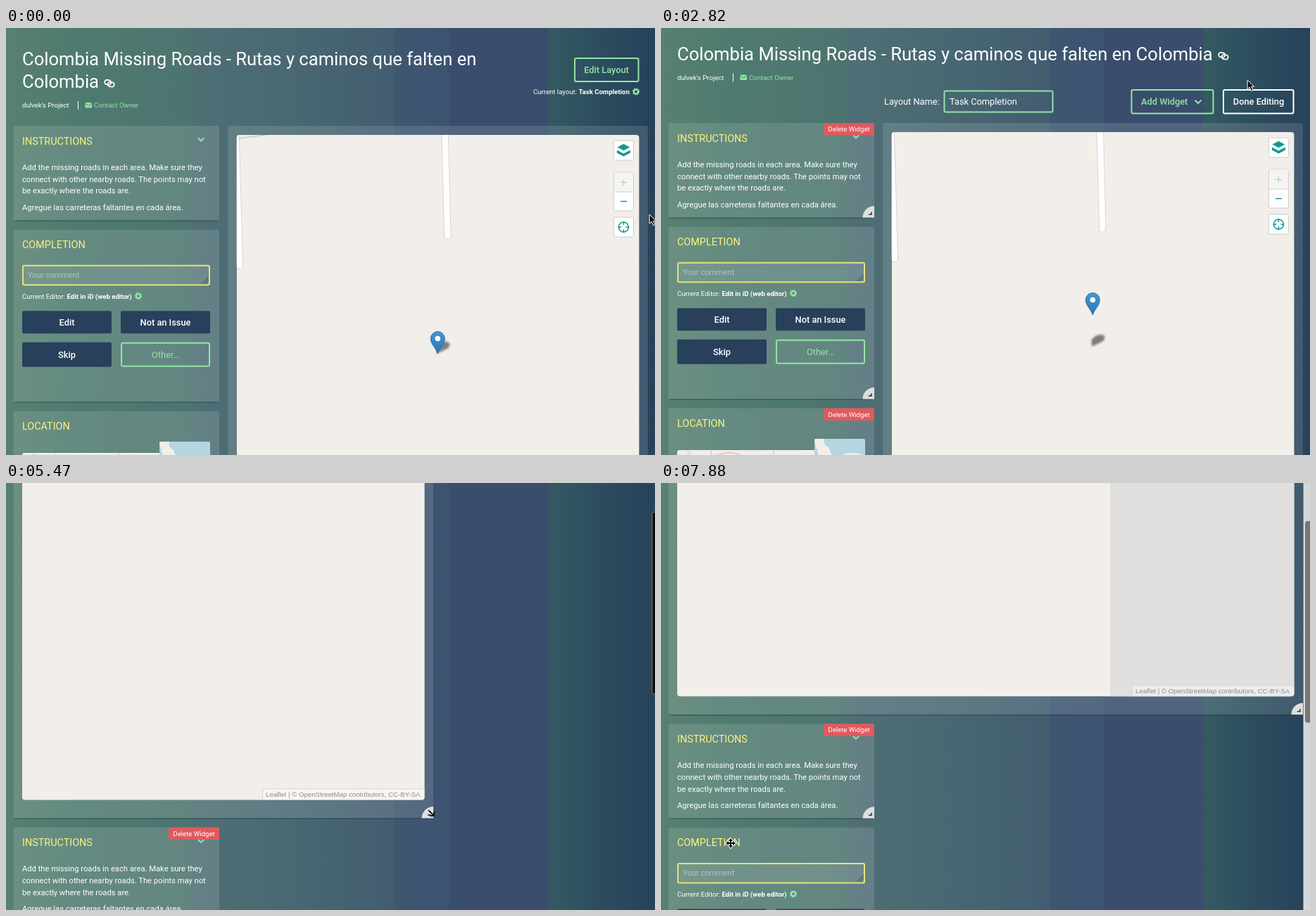
An HTML page that plays this animation: 922x607 px, repeating every 8 s.

```html
<!DOCTYPE html>
<html lang="en">
<head>
<meta charset="utf-8">
<style>
html, body { margin: 0; width: 100%; height: 100%; overflow: hidden; }
svg { display: block; font-family: Roboto, sans-serif; }
.m { font-weight: 500; }
.b { font-weight: 700; }
.i { font-style: italic; }
.c { text-anchor: middle; }
.sans { font-family: "Liberation Sans", Arial, sans-serif; }
</style>
</head>
<body>
<svg id="stage" width="922" height="607" viewBox="0 0 922 607"></svg>
<script>
const LOOP = 8000, ROW = 36.8, COL = 76.2, LEFT = 10.5;
const GREEN = '#91e6a6', YELLOW = '#f8f382', NAVY = '#28405b', TEAL = '#0f9a8c';

// --- markup helpers ---
const text = (x, y, s, size, fill = '#fff', cls = '') =>
  `<text x="${x}" y="${y}" font-size="${size}" fill="${fill}" class="${cls}">${s}</text>`;
const box = (x, y, w, h, fill, r = 0, more = '') =>
  `<rect x="${x}" y="${y}" width="${w}" height="${h}" rx="${r}" fill="${fill}" ${more}/>`;
const frame = (x, y, w, h, color) =>
  box(x + 1, y + 1, w - 2, h - 2, 'none', 2, `stroke="${color}" stroke-width="2"`);
const line = (d, color, width = 1, more = '') =>
  `<path d="${d}" fill="none" stroke="${color}" stroke-width="${width}" ${more}/>`;
const use = (id, x, y) => `<use href="#${id}" x="${x}" y="${y}"/>`;
const group = (id, body) => `<g id="${id}">${body}</g>`;
const button = (x, y, w, h, label) =>
  box(x, y, w, h, NAVY, 2) + text(x + w / 2, y + h / 2 + 4.5, label, 12.8, '#fff', 'm c');
const panel = h => box(0, 0, 292.5, h, '#fff', 3, 'fill-opacity=".12"') +
  line(`M2 ${h + .5}H290`, '#16303a', 1.5, 'opacity=".4"');
const handle = (x, y) => `<g class="edit">${use('handle', x, y)}</g>`;
const remove = `<g class="edit">${box(220.5, 0, 72, 17.5, '#df5a5f', 2)}` +
  text(256.5, 12.2, 'Delete Widget', 9.6, '#fff', 'c') + '</g>';
const chevron = (x, y) => line(`M${x - 4.5} ${y - 2.5}l4.5 4.5l4.5 -4.5`, GREEN, 2);

const stops = [[0, '#57806f'], [100, '#4f7a70'], [264, '#4d7470'], [265, '#4f6f75'], [400, '#496872'],
  [552, '#425d70'], [553, '#3f5671'], [629, '#3c5470'], [630, '#3a4d6c'], [770, '#3a4d6c'],
  [771, '#345a62'], [840, '#2d4d5f'], [922, '#27425a']];

const defs = `<defs>
  <linearGradient id="bg">${stops.map(([x, c]) => `<stop offset="${x / 922}" stop-color="${c}"/>`).join('')}</linearGradient>
  <linearGradient id="blue" x2="0" y2="1"><stop stop-color="#3f9ad6"/><stop offset="1" stop-color="#2a76b4"/></linearGradient>
  <filter id="soft" x="-50%" y="-50%" width="200%" height="200%"><feGaussianBlur stdDeviation="1.6"/></filter>
  <clipPath id="mapClip"><rect id="mapHole" rx="4"/></clipPath>
  <clipPath id="locClip">${box(12.5, 59.5, 255, 154, '#000', 3)}</clipPath>
  <clipPath id="insetClip">${box(207.5, 43.5, 72, 72, '#000', 2)}</clipPath>
  <g id="gear"><circle r="3" fill="none" stroke="${GREEN}" stroke-width="2.2"/>
    <circle r="4.3" fill="none" stroke="${GREEN}" stroke-width="1.6" stroke-dasharray="1.8 1.58"/></g>
  <g id="link" fill="none" stroke="#fff" stroke-width="1.7">
    <rect x="-7" y="-4" width="9" height="6.5" rx="3.2" transform="rotate(12)"/>
    <rect x="-2" y="-2" width="9" height="6.5" rx="3.2" transform="rotate(12)"/></g>
  <g id="handle"><path d="M0 0H-16.5A16.5 16.5 0 0 1 0 -16.5Z" fill="#dcdfde"/>
    <path d="M-4 -8V-4.5H-8" fill="none" stroke="#333" stroke-width="1.6"/></g>
  <g id="pin"><path d="M0 0C-2 -8 -10 -13 -10 -21.5A10 10 0 0 1 10 -21.5C10 -13 2 -8 0 0Z" fill="url(#blue)" stroke="#2b6ca3"/>
    <circle cy="-21.5" r="3.8" fill="#fff"/></g>
  <path id="shade" d="M-1 0L-2 -9Q4 -18 13 -17Q20 -15 15 -8Z" fill="#333" opacity=".6" filter="url(#soft)"/>
  <path id="arrow" d="M0 0V13L3.2 10.2L5.6 15.6L8 14.6L5.6 9.4H9.6Z" fill="#111" stroke="#fff"/>
  <path id="hand" d="M-2 8V-1Q0 -3 2 -1V5L8 7V12L6 16H-1L-6 9Q-5 6 -2 8Z" fill="#fff" stroke="#111"/>
  <g id="grab" stroke="#222"><path d="M-4 -3Q-2 -6 0 -4Q2 -6 4 -3Q6 -3 5 1Q4 5 2 5H-2L-5 1Q-6 -2 -4 -3Z" fill="#fff"/>
    <path d="M-2 -3V-1M0 -3V-1M2 -3V-1"/></g>
  <g id="resize"><path d="M-4.5 -4.5L3 3" stroke="#fff" stroke-width="4"/><path d="M-4 -4L3 3M4 -2V4H-2" fill="none" stroke="#111" stroke-width="2"/></g>
  <g id="move"><path d="M0 -7L3 -3H1V-1H3V-3L7 0L3 3V1H1V3H3L0 7L-3 3H-1V1H-3V3L-7 0L-3 -3V-1H-1V-3H-3Z" fill="#111" stroke="#fff" stroke-width="2" paint-order="stroke"/></g>
</defs>`;

const owner = group('owner', text(23, 113.3, 'dulvek\'s Project', 9.6) + line('M102.5 104V116', '#fff') +
  box(112.5, 106, 9.5, 7.5, GREEN, 1) + line('M112.5 107l4.7 3.6l4.8 -3.6', '#4b7473') +
  text(125, 113.3, 'Contact Owner', 9.6, GREEN));
const title = 'Colombia Missing Roads - Rutas y caminos que falten en';

const header = '<g class="view">' +
  text(23, 53.3, title, 25.6) + text(23, 85.3, 'Colombia', 25.6) + use('link', 147, 78.5) +
  frame(807, 42, 92.5, 35, GREEN) + text(853, 64.3, 'Edit Layout', 12.8, GREEN, 'm c') +
  text(749, 94.4, 'Current layout: <tspan class="b">Task Completion</tspan>', 9.6) + use('gear', 895, 90.5) + '</g>' +
  '<g class="edit">' + text(23, 46, title + ' Colombia', 25.6) + use('link', 799, 39.5) +
  text(317, 109, 'Layout Name:', 12.8) + frame(401.5, 88.5, 156, 32, GREEN) + text(410, 109, 'Task Completion', 12.8) +
  frame(667.5, 87, 118, 35.5, GREEN) + text(682, 109, 'Add Widget', 12.8, GREEN, 'm') + chevron(763, 105) +
  frame(798, 87, 101.5, 35.5, '#fff') + text(849, 109, 'Done Editing', 12.8, '#fff', 'm c') + '</g>' + owner;

const instructions = group('instr', panel(134.5) + text(12.5, 27, 'INSTRUCTIONS', 14.4, YELLOW) + chevron(266.5, 19.5) +
  ['Add the missing roads in each area. Make sure they', 'connect with other nearby roads. The points may not',
    'be exactly where the roads are.'].map((s, i) => text(12.5, 62.8 + i * 16.8, s, 11.2)).join('') +
  text(12.5, 119.8, 'Agregue las carreteras faltantes en cada área.', 11.2) + remove + handle(292.5, 134.5));

const completion = group('comp', panel(244.7) + text(12.5, 26.5, 'COMPLETION', 14.4, YELLOW) +
  box(12.5, 50, 267, 29.5, '#fff', 2, 'fill-opacity=".08"') + frame(12.5, 50, 267, 29.5, '#e3e27c') +
  line('M268 77l9 -9M272 77l5 -5', '#344', 1) + text(20.5, 68.5, 'Your comment', 11.2, '#b3c4bf') +
  text(12.5, 98.3, 'Current Editor: <tspan class="b">Edit in iD (web editor)</tspan>', 9.6) + use('gear', 177.5, 94.3) +
  button(12.5, 115.5, 127, 32, 'Edit') + button(152.5, 115.5, 127, 32, 'Not an Issue') +
  button(12.5, 160, 127, 35, 'Skip') + frame(152.5, 160, 127, 35, GREEN) + text(216, 182, 'Other…', 12.8, GREEN, 'c') +
  handle(292.5, 244.7));

const place = (x, y, s, cls) => text(x, y, s, 8, '#666', cls);
const locator = group('loc', panel(244.7) + text(12.5, 26.5, 'LOCATION', 14.4, YELLOW) +
  '<g clip-path="url(#locClip)">' + box(12, 59, 256, 155, '#f1eeea') +
  line('M12 90Q50 70 80 64T130 100T190 70M12 150Q60 120 90 160T170 130T268 170M60 60Q75 130 40 214M150 60Q135 150 190 214', '#e9b7ad', 1.1) +
  line('M30 60Q20 130 90 214M215 110Q190 150 230 214', '#d5dfcb', 6, 'opacity=".6"') +
  place(40, 108, 'Caldas', 'i') + place(28, 130, 'Manizales') + place(105, 122, 'Cundinamarca', 'i') +
  place(187.5, 75, 'Santiago') + place(187.5, 84, 'de Tunja') + use('shade', 141, 137) + use('pin', 140.5, 137) + '</g>' +
  '<g clip-path="url(#insetClip)">' + box(207, 43, 73, 73, '#b5d5e0') +
  `<path d="M207 43H222Q219 52 227 55L232 66Q238 78 246 67Q258 60 280 67V116H249Q236 105 237 91L225 79L213 66Z" fill="#f1eee7"/>` +
  line('M245 80Q258 87 256 110M256 89L280 93', '#cbbfc8') +
  `<path d="M243 72l1.9 5.1l5.4 .2l-4.3 3.4l1.5 5.2l-4.5 -3l-4.5 3l1.5 -5.2l-4.3 -3.4l5.4 -.2z" fill="#2a81cb"/></g>` +
  remove + handle(292.5, 244.7));

const control = (y, h) => box(-36, y, 28, h, '#fff', 2, 'stroke="#ccc"');
const controls = group('controls', control(8, 28) + control(53, 55) + control(117, 28) + box(-35.5, 53.5, 27, 27, '#f4f4f4') +
  line('M-36 81H-8', '#ccc') +
  `<path d="M-22 23.5l9.5 -5v4l-9.5 5l-9.5 -5v-4z" fill="${TEAL}" transform="translate(0 3)"/>` +
  `<path d="M-22 12.5l9.5 5l-9.5 5l-9.5 -5z" fill="${TEAL}" stroke="#fff" stroke-width=".6"/>` +
  line('M-26.5 67.5h9M-22 63v9', '#b3dba8', 1.3) + line('M-26.5 94.5h9', TEAL, 1.4) +
  `<circle cx="-22" cy="131" r="7" fill="none" stroke="${TEAL}" stroke-width="1.5"/>` +
  line('M-22 123v5M-22 134v5M-30 131h5M-19 131h5', TEAL, 1.5));
const roads = ['M326.5 130L332.5 338', 'M623.5 120L628 295.5'];
const map = group('map', box(0, 0, 0, 0, '#fff', 3, 'id="mapPanel" fill-opacity=".12"') +
  line('', '#16303a', 1.5, 'id="mapEdge" opacity=".4"') +
  '<g transform="translate(12.5 13)"><g clip-path="url(#mapClip)">' + box(0, 0, 900, 700, '#f2efea') +
  box(615, 0, 300, 700, '#e0dfdd') + group('pan', roads.map(d =>
    line(d, '#d8d5d3', 10.5, 'stroke-linecap="round"') + line(d, '#fff', 8.5, 'stroke-linecap="round"')).join('') +
    line('M331 157L373 151.5', '#bbb') + use('shade', 614, 463) + group('marker', use('pin', 614, 463))) +
  group('credit', box(-230, -15.5, 230, 15.5, '#fff', 0, 'fill-opacity=".4" stroke="#d8d6d3"') +
    text(-225.5, -4.2, 'Leaflet | © OpenStreetMap contributors, CC-BY-SA', 9.7, '#8b8b8b', 'sans')) +
  controls + '</g></g>' + `<g id="mapHandle">${handle(0, 0)}</g>`);

stage.innerHTML = defs + box(0, 0, 922, 607, 'url(#bg)') +
  group('page', header + box(0, 135, 0, 0, 'red', 0, 'id="ghost" fill-opacity=".2"') + instructions + completion + locator + map) +
  group('bar', box(912.5, 0, 10, 607, '#d3d9da', 0, 'id="track"') + box(0, 0, 10, 0, '#777', 4, 'id="thumb"')) +
  '<use id="cursor"/>';

// --- motion ---
const $ = id => document.getElementById(id);
const set = (id, attrs) => { for (const k in attrs) $(id).setAttribute(k, attrs[k]); };
const at = (id, x, y) => set(id, { transform: `translate(${x} ${y})` });
const show = (id, on) => $(id).style.display = on ? '' : 'none';
const clamp = (v, lo, hi) => Math.min(hi, Math.max(lo, v));

// Piecewise linear value from [time, value...] keys
function track(keys, t, n = 1) {
  let i = keys.findIndex(k => k[0] > t);
  if (i < 0) return keys[keys.length - 1][n];
  if (!i) return keys[0][n];
  const a = keys[i - 1], b = keys[i];
  return a[n] + (b[n] - a[n]) * (t - a[0]) / (b[0] - a[0]);
}

const scrollKeys = [[290, 0], [500, 120], [780, 270], [930, 270], [1240, 73], [1350, 0], [4350, 0], [4590, 308]];
const mouseKeys = [[290, 914, 265], [350, 915, 266], [1590, 915, 266], [2000, 870, 80], [2180, 853, 52], [2400, 853, 52],
  [2820, 833.5, 73.5], [3180, 677, 220], [3650, 338, 186], [3940, 372, 221], [4000, 372, 221], [4180, 710, 283],
  [4820, 710, 283], [5470, 604, 469], [5820, 604, 469], [6000, 710, 468], [6250, 875, 450], [6350, 916, 420],
  [6590, 917, 400], [7000, 914, 316], [7180, 914, 316], [7410, 190, 570], [7590, 190, 570], [7880, 99, 512]];
const mouse = t => [track(mouseKeys, t, 1), track(mouseKeys, t, 2)];

const DRAG = [3180, 4000], SIZE = [5820, 7180];
const during = (t, [a, b]) => t >= a && t < b;

// Grid cell of the map: column, width, rows
function cell(t) {
  const col = t < DRAG[0] ? 4 : t < DRAG[1] ? clamp(4 + Math.round((mouse(t)[0] - 677) / COL), 0, 4) : 0;
  if (t < SIZE[0]) return { col, cols: 8, rows: 18 };
  const [x, y] = mouse(Math.min(t, SIZE[1]));
  return { col, cols: clamp(8 + Math.round((x - 604) / COL), 8, 12), rows: clamp(18 + Math.round((y - 469) / ROW), 14, 18) };
}
// The side widgets glide 200 ms behind the grid
function pushed(t) {
  let sum = 0;
  for (let i = 0; i < 20; i++) {
    const c = cell(t - i * 10);
    if (c.col < 4) sum += c.rows * ROW;
  }
  return sum / 20;
}

const cursors = [[0, 'arrow'], [2060, 'hand'], [2450, 'arrow'], [3180, 'grab'], [4000, 'arrow'],
  [5420, 'resize'], [6200, 'arrow'], [7700, 'move']];

function draw(t) {
  const edit = t >= 2350, top = edit ? 135 : 139, scroll = track(scrollKeys, t);
  const [mx, my] = mouse(t), { col, cols, rows } = cell(t);
  document.querySelectorAll('.view').forEach(e => e.style.display = edit ? 'none' : '');
  document.querySelectorAll('.edit').forEach(e => e.style.display = edit ? '' : 'none');
  at('page', 0, -scroll);
  at('owner', 0, edit ? -39.5 : 0);

  const y = top + pushed(t);
  at('instr', LEFT, y);
  at('comp', LEFT, y + 4 * ROW + .5);
  at('loc', LEFT, y + 11 * ROW + .8);

  const w = cols * COL - 13, h = rows * ROW - 13, dragging = during(t, DRAG);
  const [dx, dy] = dragging ? [mx - 677, my - 220] : [t < DRAG[0] ? 0 : -305, 0];
  at('map', dragging ? 315.7 + dx : LEFT + col * COL, top + dy);
  const mw = w - 25, mh = h - (edit ? 39 : 27);
  set('mapPanel', { width: w, height: h });
  set('mapEdge', { d: `M2 ${h + .5}H${w - 2}` });
  set('mapHole', { width: mw, height: mh });
  at('pan', dx - 328.5, dy - 152 - (edit ? 6 : 0));
  at('marker', 0, during(t, [2460, 3180]) ? -45 * Math.abs(Math.sin(Math.PI * (t - 2700) / 240)) : 0);
  at('credit', mw, mh);
  at('controls', mw, 0);
  at('mapHandle', w, h);
  show('ghost', dragging || during(t, SIZE));
  set('ghost', { x: LEFT + col * COL, width: w, height: h });

  const wide = during(t, [290, 1750]) || t >= 6300;
  const k = edit ? .396 + (18 - rows) * .0105 : .64;
  show('bar', wide || t >= 3240);
  show('track', wide);
  set('thumb', { x: wide ? 915 : 918, y: -81 + scroll * k, height: 655 * k, fill: wide ? '#777' : '#0b0b0b',
    stroke: wide ? 'none' : '#667a84' });

  set('cursor', { href: '#' + cursors.filter(c => c[0] <= t).pop()[1], x: mx, y: my });
}

function tick() {
  draw(performance.now() % LOOP);
  requestAnimationFrame(tick);
}
tick();
</script>
</body>
</html>
```
